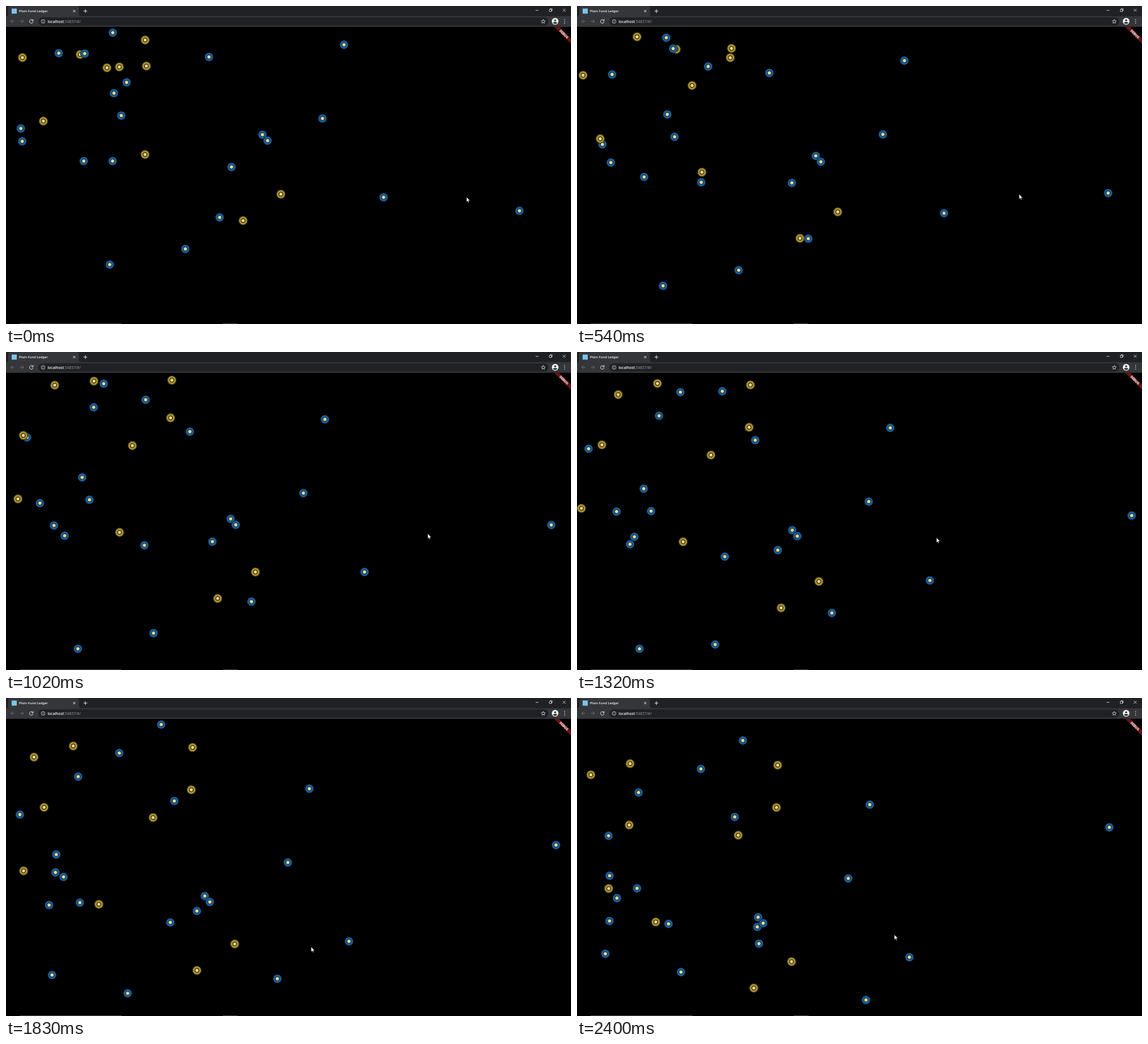
Recreate the animation shown at these times as an HTML page. Size 998 px wide and 561 px high, loop 2.43 s.

```html
<!DOCTYPE html>
<html lang="en">
<head>
<meta charset="utf-8">
<title>Bouncing particles</title>
<style>
  html, body { margin: 0; width: 100%; height: 100%; overflow: hidden; background: #000; }
  svg { display: block; }
  text { font-family: "Open Sans", sans-serif; font-weight: 600; fill: #f4f5f6; }
  .icon { fill: none; stroke: #e8eaed; stroke-width: .8; }
</style>
</head>
<body>
<svg width="998" height="561" viewBox="0 0 998 561">
  <defs>
    <radialGradient id="blueFill">
      <stop offset="0" stop-color="#fbeeb0"/>
      <stop offset=".28" stop-color="#ecd27c"/>
      <stop offset=".4" stop-color="#4f5048"/>
      <stop offset=".48" stop-color="#0f3f6c"/>
      <stop offset=".66" stop-color="#1a66a4"/>
      <stop offset=".8" stop-color="#19609b"/>
      <stop offset="1" stop-color="#03101c"/>
    </radialGradient>
    <radialGradient id="goldFill">
      <stop offset="0" stop-color="#fbedbd"/>
      <stop offset=".26" stop-color="#ebcf98"/>
      <stop offset=".38" stop-color="#4f3214"/>
      <stop offset=".46" stop-color="#4a3a12"/>
      <stop offset=".58" stop-color="#b8a436"/>
      <stop offset=".76" stop-color="#a08d2a"/>
      <stop offset="1" stop-color="#171303"/>
    </radialGradient>
    <circle id="blue" r="8" fill="url(#blueFill)"/>
    <circle id="gold" r="8.3" fill="url(#goldFill)"/>
    <clipPath id="page"><rect y="37" width="998" height="524"/></clipPath>
  </defs>

  <g clip-path="url(#page)">
    <g id="particles"></g>
    <g transform="translate(985.5 49.5) rotate(45)">
      <rect x="-30" y="-3.1" width="60" height="6.2" fill="#6c1310"/>
      <text y="2.1" text-anchor="middle" style="font:900 6px Roboto,sans-serif">DEBUG</text>
    </g>
  </g>
  <path d="M24 560.5H204M383 560.5H409" stroke="#4a4a4a"/>

  <rect width="998" height="18" fill="#202124"/>
  <path d="M0 18Q4 18 4 14V4Q4 0 8 0H125Q129 0 129 4V14Q129 18 133 18H998V36.7H0Z" fill="#35363a"/>
  <rect x="57" y="20" width="901" height="14.5" rx="7.2" fill="#202124"/>
  <rect x="10" y="4.5" width="9" height="9" fill="#7cc4ee"/>
  <text x="23" y="11.2" font-size="5.9">Plain Fund Ledger</text>
  <text x="73.5" y="29.6" font-size="6.6">localhost<tspan fill="#9aa0a6" font-weight="400">:54857/#/</tspan></text>

  <g class="icon">
    <path d="M118.5 7l4 4m0-4l-4 4M137 9h6.5m-3.25-3.25v6.5" stroke-width="1"/>
    <path d="M935.5 7.7h5M983.5 5l5 5m0-5l-5 5M959.8 6h3.7v3.7h-3.7zM961 6V4.8h3.7v3.7h-1.2"/>
    <path d="M15 27H8.5m3.2-3.2L8.5 27l3.2 3.2M24.5 27H31m-3.2-3.2L31 27l-3.2 3.2" stroke="#797b7f"/>
    <path d="M47.3 25.2A3.2 3.2 0 1 0 47.9 28M48 23.5v2.7h-2.7" stroke-width="1"/>
    <path d="M65.5 26.7v2.2m0-3.7v.8"/>
    <circle cx="65.5" cy="27.2" r="3.3"/>
    <path d="M949 23.7l1 2.3 2.5.2-1.9 1.7.6 2.5-2.2-1.3-2.2 1.3.6-2.5-1.9-1.7 2.5-.2z"/>
    <path d="M986.7 23.8v.01m0 3.2v.01m0 3.2v.01" stroke-width="1.6" stroke-linecap="round"/>
  </g>
  <circle cx="970" cy="27" r="5.9" fill="#f1f3f4"/>
  <circle cx="970" cy="25.2" r="1.8" fill="#35363a"/>
  <path d="M966.3 30.3Q966.5 28 970 28T973.7 30.3Q970 33 966.3 30.3" fill="#35363a"/>

  <path id="cursor" d="M0 0V8.8L2 7l1.3 3 1.4-.6L3.4 6.5H6.2Z" fill="#fff" stroke="#000" stroke-width=".5"/>
</svg>

<script>
const LOOP = 2430, FRAME = 30;
const STEPS_PER_FRAME = 0.8, FIRST_STEP = 0.6, STEP_SIZE = 0.416;
const WALLS = { left: 8.5, right: 989, top: 45.85, bottom: 533.5 };

const layer = document.getElementById('particles');
const cursor = document.getElementById('cursor');
const particles = [];

// Adds particles that share a look and a velocity, each at its own start point
function spawn(look, vx, vy, ...starts) {
  for (const [x, y] of starts) {
    const node = document.createElementNS(layer.namespaceURI, 'use');
    node.setAttribute('href', '#' + look);
    layer.append(node);
    particles.push({ node, x, y, vx: vx * STEP_SIZE, vy: vy * STEP_SIZE });
  }
}

spawn('blue', -5, 6, [93.2, 83.3]);
spawn('blue', 3, 4.5, [26.2, 216]);
spawn('gold', -4, 5, [29, 91], [66, 203], [245.6, 262], [485.5, 332], [418.8, 378.6]);
spawn('gold', -4, -5, [131, 85.55], [200.3, 107.5]);
spawn('gold', 4, 5, [178.3, 109], [245.8, 60]);
spawn('gold', 4, -5, [248, 105.95]);
spawn('blue', -3, 4.5, [188.6, 47], [358.5, 90], [597, 68.3], [137.3, 273.6], [559, 198.4], [398.3, 284], [667, 337.5]);
spawn('blue', 3, -4.5, [139, 84], [213, 134.8]);
spawn('blue', -5, 6, [190.7, 153.8], [203.6, 193.3], [453, 227], [462, 237.5], [316.8, 428.6], [183.2, 456.2]);
spawn('blue', 5, 6, [28.6, 238.7], [188.3, 273.6], [377.4, 373]);
spawn('blue', 5, -5, [907, 361.3]);

// Pointer path: time, x, y
const pointerPath = [
  [0, 813.5, 337], [540, 781, 332], [1020, 745, 320.5], [1320, 635, 327.5],
  [1830, 539, 439], [2070, 549, 433], [2400, 560.5, 417.5],
];

const place = (node, x, y) => node.setAttribute('transform', `translate(${x} ${y})`);

// Position on one axis; the direction flips on the first step past a wall
function bounce(pos, speed, steps, min, max) {
  for (let i = 0; i < steps; i++) {
    pos += speed;
    if (pos < min || pos > max) speed = -speed;
  }
  return pos;
}

function pointerAt(time) {
  const i = Math.max(1, pointerPath.findIndex(([t]) => t >= time));
  const [t0, x0, y0] = pointerPath[i - 1], [t1, x1, y1] = pointerPath[i];
  const part = (time - t0) / (t1 - t0);
  return [x0 + (x1 - x0) * part, y0 + (y1 - y0) * part];
}

function draw() {
  const frame = Math.floor(performance.now() % LOOP / FRAME);
  const steps = Math.floor(frame * STEPS_PER_FRAME + FIRST_STEP);
  for (const { node, x, y, vx, vy } of particles) {
    place(node,
      bounce(x, vx, steps, WALLS.left, WALLS.right),
      bounce(y, vy, steps, WALLS.top, WALLS.bottom));
  }
  place(cursor, ...pointerAt(frame * FRAME));
  requestAnimationFrame(draw);
}
draw();
</script>
</body>
</html>
```
